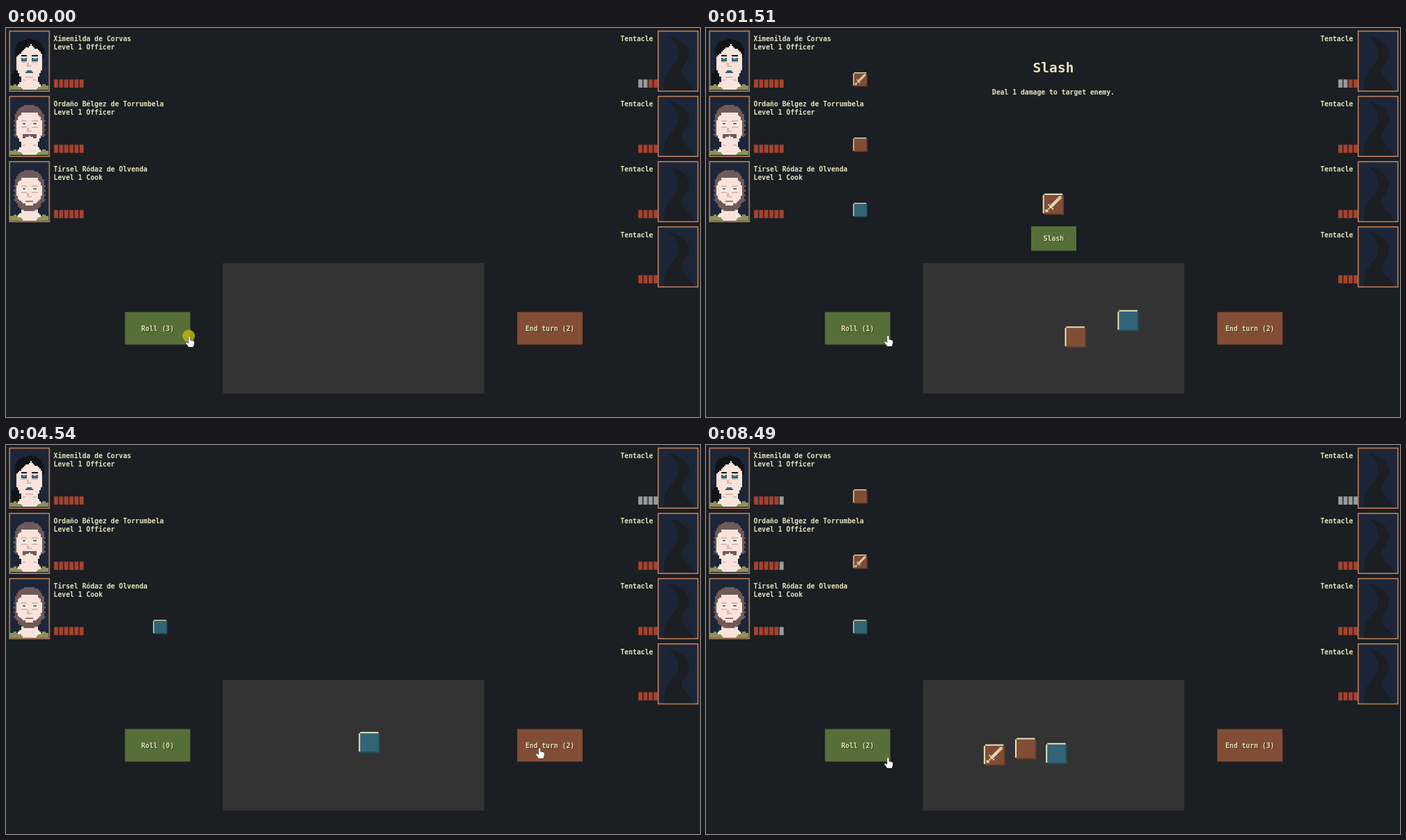
An HTML page with a canvas that plays this animation: 999x561 px, repeating every 8510 ms.

```html
<!DOCTYPE html>
<html lang="en">
<head>
<meta charset="utf-8">
<title>Dice battle</title>
<style>
html, body { margin: 0; width: 100%; height: 100%; overflow: hidden; background: #1b1e22; }
canvas { display: block; }
</style>
</head>
<body>
<canvas id="stage" width="999" height="561"></canvas>
<script>
const LOOP = 8510, ROW = 94.1;
const ROLLS = [20, 1140, 1780, 8360], GROUP = 690, PAIR = 2650, SLASH = 3920, END = 5260, WAVE = 6370, HIT = 7290;
const CREAM = '#e6e3bd', BG = '#1b1e22', GREEN = '#566f39', RUST = '#824d35';
const FONT = 'px "DejaVu Sans Mono", "Liberation Mono", monospace';
const stage = document.getElementById('stage').getContext('2d');
let g = stage;

const HEROES = [
  ['Ximenilda de Corvas', 'Level 1 Officer'],
  ['Ordaño Bélgez de Torrumbela', 'Level 1 Officer'],
  ['Tirsel Ródaz de Olvenda', 'Level 1 Cook']
];

function rect(color, x, y, w, h) {
  g.fillStyle = color;
  g.fillRect(x, y, w, h);
}

function text(str, x, y, align = 'left', size = 9.77) {
  g.font = 'bold ' + size + FONT;
  g.textAlign = align;
  g.fillStyle = CREAM;
  g.fillText(str, x, y + size * 0.36);
}

function button(label, color, x, y, w, h) {
  rect(color, x, y, w, h);
  g.shadowColor = 'rgba(0,0,0,.5)';
  g.shadowOffsetX = g.shadowOffsetY = 1;
  text(label, x + w / 2, y + h / 2, 'center');
  g.shadowColor = 'transparent';
}

function frame(x, y) {
  rect('#bd7f58', x, y, 58.8, 88.2);
  rect('#1d2638', x + 1.6, y + 1.6, 55.6, 85);
}

// Portraits are sampled on a grid of 25 by 38 cells; u is the distance from the middle column.
const CELL = 2.2;
function portrait(y, beard, woman) {
  const skin = '#f9e3da', shade = '#d9b9b0';
  const hair = woman ? '#111417' : '#6f5a59', eye = woman ? '#2c6577' : '#66705f';
  const paint = (color, inside) => {
    for (let r = 0; r < 38; r++) {
      for (let c = 0; c < 25; c++) {
        if (!inside(c + 0.5, r + 0.5, Math.abs(c - 12))) continue;
        const x = Math.round(6.2 + c * CELL), top = Math.round(y + 2 + r * CELL);
        rect(color, x, top, Math.round(6.2 + (c + 1) * CELL) - x, Math.round(y + 2 + (r + 1) * CELL) - top);
      }
    }
  };
  const oval = (cy, rx, ry) => (c, r, u) => (u / rx) ** 2 + ((r - cy) / ry) ** 2 < 1;
  const band = (r0, r1, u0, u1) => (c, r, u) => r > r0 && r < r1 && u >= u0 && u <= u1;

  if (woman) paint(hair, (c, r) => ((c - 3.5) / 3) ** 2 + ((r - 31) / 6) ** 2 < 1);
  paint(skin, (c, r, u) => r > 28 && u < 5.5 + Math.max(0, r - 33) * 1.2);
  paint('#89935a', (c, r, u) => r > 33 && u > (41 - r) * 1.3 && u < 6 + (r - 32) * 2);
  paint(shade, band(31, 32, 0, 4));

  const face = beard ? oval(18, 8.7, 10) : oval(19, 9, 13);
  if (woman) {
    paint(hair, (c, r, u) => r < 17 && oval(14, 9.9, 9.6)(c, r, u));
    paint(skin, (c, r, u) => face(c, r, u) && r > 8 + Math.abs(c - 13.4) * 0.85);
    paint(shade, band(29, 30, 0, 2));
  } else {
    paint(hair, oval(15, 9.9, 10.3));
    paint(hair, (c, r, u) => r > 14 && r < 26 && u < 9.5 + (Math.floor(r) % 3 ? 0 : 1));
    if (beard) paint(hair, oval(21, 9.3, 11.5));
    paint(skin, (c, r, u) => face(c, r, u) && r > 10 + Math.max(0, u - 5) * 1.5);
  }

  paint(woman ? hair : shade, band(15, 16, 2, 5));
  paint(woman ? eye : '#fff3ec', band(17, 19, 2, 5));
  paint(woman ? '#8ab0a9' : eye, band(17, 18, 3, 4));
  paint(shade, band(19, 20, 2, 5));
  paint(shade, (c, r) => c > 11 && c < 12 && r > 20 && r < 23);
  paint(shade, band(22, 23, 0, 1));
  if (woman) paint(eye, (c, r, u) => r > 25 && r < 27 && u < r - 23.5);
  else if (beard) paint('#a37670', band(25, 26, 0, 2));
  else paint(hair, (c, r, u) => r > 24 && r < 27 && u < 5 && u > (r - 25) * 2 - 1);
}

const tentacle = new Path2D('M954 12C970 14 985 26 983 40C981 50 972 56 972 63' +
  'C974 71 983 78 991 90H948C946 78 949 67 957 58C966 48 970 42 967 31C965 23 960 17 954 12Z');

function drawBackdrop() {
  rect(BG, 0, 0, 999, 561);
  rect('#333333', 312.2, 339, 376.3, 188.2);
  HEROES.forEach(([name, role], i) => {
    const y = 3.7 + i * ROW;
    frame(4.4, y);
    portrait(y, i === 2, i === 0);
    text(name, 68.5, y + 12);
    text(role, 68.5, y + 23.8);
  });
  for (let i = 0; i < 4; i++) {
    frame(938, 3.7 + i * ROW);
    g.save();
    g.translate(0, i * ROW);
    g.fillStyle = BG;
    g.fill(tentacle);
    g.restore();
    text('Tentacle', 931.5, 15.7 + i * ROW, 'right');
  }
}

const backdrop = document.createElement('canvas');
backdrop.width = 999;
backdrop.height = 561;
g = backdrop.getContext('2d');
drawBackdrop();
g = stage;

// Icons are stepped polylines on a 16 by 16 grid.
const ICONS = {
  blank: '',
  sword: '2,13 4,11|3,13 2,12|4,8 7,11|5,10 13,2|5,9 12,2|6,10 13,3',
  wave: '3,13 3,9 6,4 7,3 10,3 12,6|9,6 8,8 9,11',
  swell: '2,6 4,4 6,6|9,7 10,6 12,7 13,6|6,13 8,11 10,13'
};
const SKINS = { red: [RUST, '#69402f'], blue: ['#326477', '#254d5c'], sea: [BG, '#235a6b'] };

function drawIcon(name, x, y, u) {
  for (const line of ICONS[name].split('|').filter(Boolean)) {
    const pts = line.split(' ').map(p => p.split(',').map(Number));
    for (let i = 1; i < pts.length; i++) {
      const [ax, ay] = pts[i - 1], [bx, by] = pts[i];
      const n = Math.max(Math.abs(bx - ax), Math.abs(by - ay));
      for (let k = 0; k <= n; k++) {
        const c = Math.round(ax + (bx - ax) * k / n), r = Math.round(ay + (by - ay) * k / n);
        rect(CREAM, x + c * u, y + r * u, u + 0.1, u + 0.1);
      }
    }
  }
}

function drawDie(cx, cy, size, skin, face) {
  const x = cx - size / 2, y = cy - size / 2, e = size / 15;
  const [fill, shade] = SKINS[skin];
  rect(shade, x + e, y + e, size - e, size - e);
  rect(fill, x + e, y + e, size - 2 * e, size - 2 * e);
  rect(CREAM, x + e, y, size - 2 * e, e);
  rect(CREAM, x, y + e, e, size - 2 * e);
  drawIcon(face, x, y, size / 16);
}

// Stops are [time, x, y]: a stop inside the tray is thrown to, one above it is slid to.
const die = (skin, face, row, from, to, ...stops) => ({ skin, face, row, from, to, stops });
const [ROLL1, ROLL2, ROLL3, ROLL4] = ROLLS;
const DICE = [
  die('red', 'sword', 0, ROLL1, SLASH, [ROLL1, 572, 464], [GROUP, 500, 254], [1600, 500, 251], [PAIR, 480, 251]),
  die('red', 'sword', 1, ROLL1, SLASH, [ROLL1, 489, 440], [ROLL2, 560, 448], [ROLL3, 580, 470], [PAIR, 522, 254]),
  die('blue', 'blank', 2, ROLL1, END, [ROLL1, 549, 429], [ROLL2, 650, 420], [ROLL3, 523, 429]),
  die('sea', 'wave', 1, END, HIT, [END, 587, 427], [WAVE, 522, 254]),
  die('sea', 'swell', 2, END, HIT, [END, 533, 460], [WAVE, 480, 251]),
  die('sea', 'blank', 3, END, HIT, [END, 480, 364]),
  die('red', 'blank', 0, ROLL4, LOOP, [ROLL4, 547, 443]),
  die('red', 'sword', 1, ROLL4, LOOP, [ROLL4, 453, 462]),
  die('blue', 'blank', 2, ROLL4, LOOP, [ROLL4, 639, 458])
];
const TRAY_TOP = 339, SPAWN = [380, 433], FRICTION = 5, SLIDE = 180;
const smooth = p => p * p * (3 - 2 * p);

function diePlace(stops, t) {
  let place = SPAWN;
  for (const [start, x, y] of stops) {
    if (t < start) break;
    const thrown = y > TRAY_TOP;
    const [fx, fy] = thrown ? SPAWN : place;
    const p = thrown ? 1 - Math.exp(-FRICTION * (t - start) / 1000) : smooth(Math.min(1, (t - start) / SLIDE));
    place = [fx + (x - fx) * p, fy + (y - fy) * p];
  }
  return place;
}

function drawDice(t) {
  for (const d of DICE) {
    if (t < d.from || t >= d.to) continue;
    // The second hero only turns up a sword on the third roll.
    const face = d.row === 1 && t < ROLL3 ? 'blank' : d.face;
    drawDie(...diePlace(d.stops, t), 30.5, d.skin, face);
    drawDie(d.skin === 'sea' ? 779 : 222, 74.2 + d.row * ROW, 20.5, d.skin, face);
  }
}

function bar(x, row, total, isFull) {
  for (let i = 0; i < total; i++) {
    rect(isFull(i) ? '#a6422d' : '#999b9b', x + i * 7.35, 74.2 + row * ROW, 5.9, 11.8);
  }
}

function drawBars(t) {
  for (let i = 0; i < 3; i++) bar(69.1, i, 6, n => t < HIT || n < 5);
  for (let i = 0; i < 4; i++) bar(910.2, i, 4, n => i > 0 || t < SLASH && n > 1);
}

const slashing = t => t >= GROUP && t < SLASH;

function headline(title, detail) {
  text(title, 500, 56.7, 'center', 19.54);
  text(detail, 500, 92, 'center');
}

function drawTexts(t) {
  const turnStart = t < END ? 0 : END;
  const used = ROLLS.filter(r => r >= turnStart && r <= t).length;
  button(`Roll (${3 - used})`, GREEN, 171.2, 409.6, 94.1, 47);
  button(`End turn (${turnStart ? 3 : 2})`, RUST, 735.9, 409.6, 94.1, 47);
  if (slashing(t)) {
    headline('Slash', `Deal ${t < PAIR ? 1 : 2} damage to target enemy.`);
    button('Slash', GREEN, 468, 286, 65, 35.3);
  } else if (t >= WAVE && t < HIT) {
    headline('Wave', 'Deal 1 damage to all enemies!');
  }
}

// Pointer moves: [start, end, x, y].
const MOVES = [
  [890, 970, 268, 447], [1030, 1120, 261, 443], [2300, 2640, 446, 468], [2650, 3020, 556, 360],
  [3020, 3360, 507, 307], [4380, 4540, 767, 436], [5380, 5660, 680, 420], [5930, 6160, 680, 458],
  [6940, 7150, 644, 443], [7290, 8140, 250, 457], [8160, 8200, 261, 450]
];
const CLICKS = [...ROLLS, SLASH, END], PRESS = 20, RIPPLE = 120;
const arrow = new Path2D('M0 0V11.5L2.5 9.2L4.3 13.5L6.3 12.7L4.6 8.5H7.8Z');
const hand = new Path2D('M-.3 2Q1 0 2.3 2V7L3.2 6.2L5 7L6.2 7L7.8 8.2V12L6.4 16H-.2' +
  'L-1.2 14.2L-4.2 10.4Q-4 8.4 -2.2 9.6L-.3 11.2Z');

function drawPointer(t) {
  let x = 263, y = 444;
  for (const [start, end, tx, ty] of MOVES) {
    const p = Math.min(1, Math.max(0, (t - start) / (end - start)));
    x += (tx - x) * p;
    y += (ty - y) * p;
  }
  for (const click of CLICKS) {
    const age = (t - click + PRESS) / RIPPLE;
    if (age < 0 || age > 1) continue;
    g.fillStyle = `rgba(190,181,14,${0.85 * (1 - age)})`;
    g.beginPath();
    g.arc(x, y, 9, 0, Math.PI * 2);
    g.fill();
  }
  const over = (bx, by, w, h) => x > bx && x < bx + w && y > by && y < by + h;
  const linked = over(171, 409, 94, 48) || over(736, 409, 94, 48) || slashing(t) && over(468, 286, 65, 35);
  const shape = linked ? hand : arrow;
  g.save();
  g.translate(x, y);
  g.strokeStyle = '#15181b';
  g.fillStyle = '#fff';
  g.stroke(shape);
  g.fill(shape);
  g.restore();
}

function draw(t) {
  g.drawImage(backdrop, 0, 0);
  drawBars(t);
  drawTexts(t);
  drawDice(t);
  drawPointer(t);
}

const begin = performance.now();
function tick() {
  draw(Math.max(0, performance.now() - begin) % LOOP);
  requestAnimationFrame(tick);
}
draw(0);
requestAnimationFrame(tick);
</script>
</body>
</html>
```
